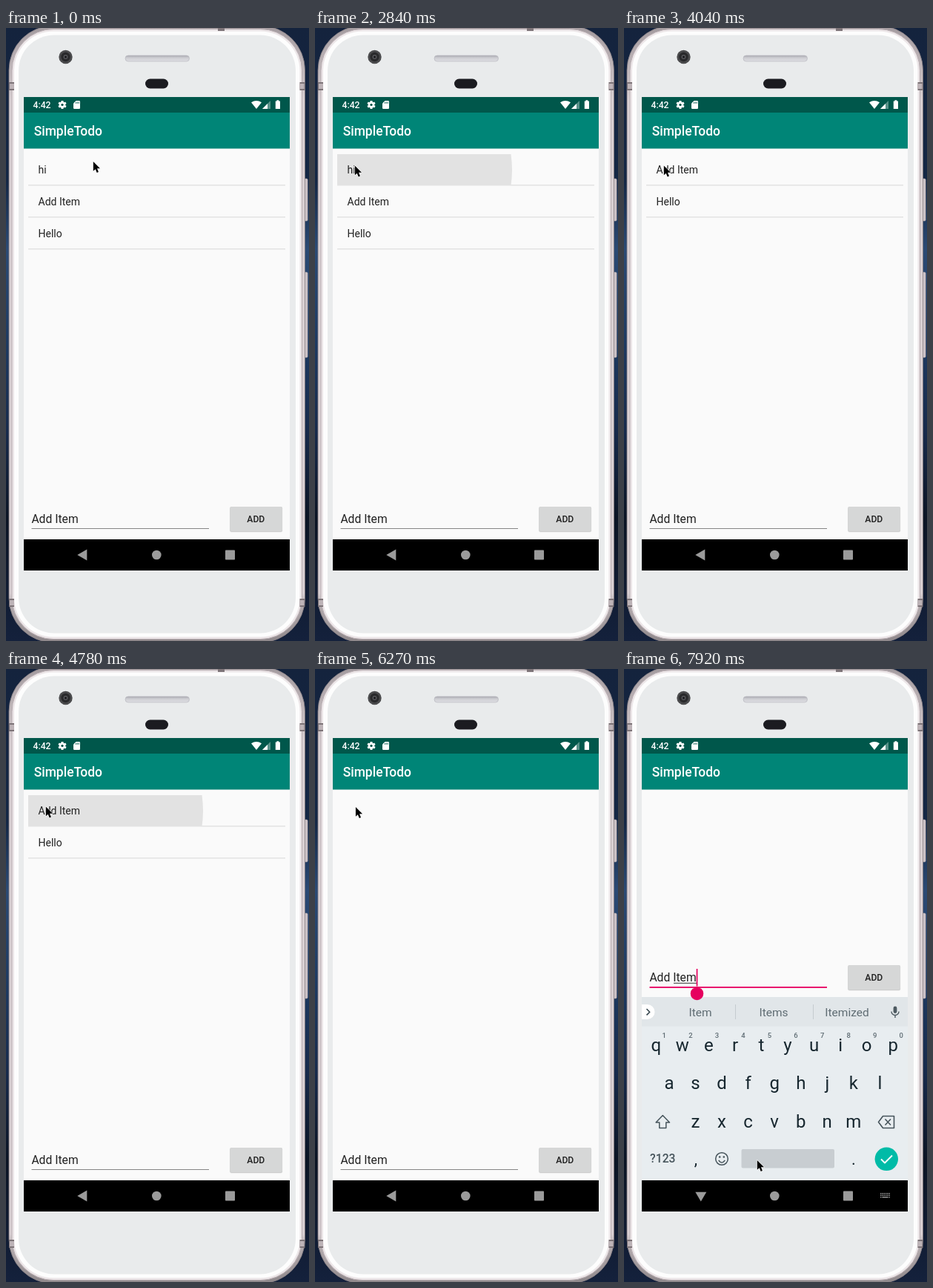
Animation of 409x826 px, one loop 8 s. Source, as an HTML page:

```html
<!DOCTYPE html>
<html lang="en">
<head>
<meta charset="utf-8">
<title>Todo list on a phone</title>
<style>
html, body { margin: 0; width: 100%; height: 100%; overflow: hidden; background: #12203a; }
svg { display: block; width: 409px; height: 826px; font-family: Roboto, sans-serif; }
.medium { font-weight: 500; }
.mid { text-anchor: middle; }
</style>
</head>
<body>
<svg viewBox="0 0 409 826" xmlns="http://www.w3.org/2000/svg">
  <defs>
    <linearGradient id="night" x2="0" y2="1">
      <stop offset="0" stop-color="#14233d"/>
      <stop offset=".25" stop-color="#142745"/>
      <stop offset=".36" stop-color="#2b4a74"/>
      <stop offset=".52" stop-color="#1d3960"/>
      <stop offset=".66" stop-color="#172a4b"/>
      <stop offset=".8" stop-color="#0b1424"/>
      <stop offset="1" stop-color="#14213c"/>
    </linearGradient>
    <linearGradient id="rim" x2="0" y2="1">
      <stop offset="0" stop-color="#a39b9f"/>
      <stop offset=".09" stop-color="#c9c0c3"/>
      <stop offset=".12" stop-color="#d9d0d3"/>
      <stop offset=".92" stop-color="#d9d0d3"/>
      <stop offset=".94" stop-color="#b3abae"/>
      <stop offset="1" stop-color="#8f888b"/>
    </linearGradient>
    <linearGradient id="slot" x2="0" y2="1">
      <stop offset="0" stop-color="#a9a9b0"/>
      <stop offset=".4" stop-color="#cdcdd2"/>
      <stop offset="1" stop-color="#dfdfe3"/>
    </linearGradient>
    <clipPath id="rowClip"><rect x="30" y="170" width="347" height="42"/></clipPath>
    <clipPath id="keysClip"><rect x="24" y="400" width="359" height="289"/></clipPath>
  </defs>

  <rect width="409" height="826" fill="url(#night)"/>

  <!-- phone body -->
  <g fill="#cfc5c9" stroke="#9d9499" stroke-width=".6">
    <rect x="401" y="203" width="6.200" height="57" rx="1.500"/>
    <rect x="401" y="329" width="6.200" height="115" rx="1.500"/>
  </g>
  <rect x="4" y="-3" width="399.500" height="831" rx="60" fill="url(#rim)" stroke="#8b8286" stroke-width=".8"/>
  <rect x="8" y="1.500" width="391.500" height="822" rx="56" fill="#ece6e8" stroke="#b9aeb2" stroke-width="1"/>
  <rect x="11" y="4.500" width="385.500" height="816" rx="53" fill="#fdfdfd"/>
  <rect x="17" y="9.500" width="374" height="806" rx="48" fill="#e9ebec"/>
  <g fill="#7d7478">
    <rect x="4" y="73" width="7" height="11"/>
    <rect x="396.500" y="73" width="7" height="11"/>
    <rect x="4" y="769" width="7" height="11"/>
    <rect x="396.500" y="769" width="7" height="11"/>
    <rect x="286" y="0" width="9" height="4"/>
  </g>
  <g fill="#bdb3b7">
    <rect x="5" y="75" width="6" height="7"/>
    <rect x="396.500" y="75" width="6" height="7"/>
    <rect x="5" y="771" width="6" height="7"/>
    <rect x="396.500" y="771" width="6" height="7"/>
  </g>
  <rect x="161" y="37" width="86.500" height="8" rx="4" fill="url(#slot)" stroke="#b9b9c0" stroke-width=".7"/>
  <circle cx="80.500" cy="39" r="9.200" fill="#4a4a4c"/>
  <circle cx="80.500" cy="39" r="6.200" fill="#29292b"/>
  <circle cx="80.500" cy="39" r="3" fill="#55555a"/>
  <circle cx="80.500" cy="39" r="1.500" fill="#161618"/>
  <rect x="188" y="68.500" width="31" height="13" rx="6.500" fill="#1b1b20"/>

  <!-- screen -->
  <rect x="24" y="93" width="359" height="638" fill="#fafafa"/>
  <rect x="24" y="93" width="359" height="21" fill="#00574b"/>
  <rect x="24" y="114" width="359" height="48.500" fill="#008577"/>
  <text x="36.500" y="108" font-size="12.2" class="medium" fill="#fff">4:42</text>
  <g id="gear" transform="translate(76 103.500)"></g>
  <path d="M94.500 98h4.300q1.200 0 1.200 1.200v8.600q0 1.200-1.200 1.200h-6.600q-1.200 0-1.200-1.200v-6.300z" fill="#fff"/>
  <path d="M94.400 99.800v2M96.300 99.500v2.300M98.200 99.500v2.300" stroke="#00574b" stroke-width=".9"/>
  <path d="M331 100.300Q338 95.600 345 100.300L338 109z" fill="#fff"/>
  <path d="M357 98v11h-11z" fill="#fff" opacity=".35"/>
  <path d="M353 102v7h-7z" fill="#fff"/>
  <path d="M365.500 97.200h2.800v1.200h1.700v10.600h-6.200V98.400h1.700z" fill="#fff"/>
  <text x="37.700" y="145" font-size="17.46" class="medium" fill="#fff">SimpleTodo</text>

  <g clip-path="url(#rowClip)"><circle id="ripple"/></g>
  <g id="rows" font-size="13.97" fill="#212121"></g>

  <g id="form">
    <text x="34.400" y="667" font-size="15.7" fill="#212121">Add Item</text>
    <rect id="line" x="34.500" width="239.500"/>
    <rect id="wordLine" x="67" y="668.800" width="31" height="1" fill="#333"/>
    <rect id="caret" x="97.700" y="650" width="1.700" height="23.500" fill="#e6005f"/>
    <rect x="302" y="646" width="71.300" height="33.500" rx="2" fill="#000" opacity=".07"/>
    <rect x="302.300" y="645.200" width="70.700" height="33.500" rx="2" fill="#c4c5c5"/>
    <rect x="302.300" y="645" width="70.700" height="33" rx="2" fill="#d6d7d7"/>
    <text x="337.300" y="666" font-size="12.2" class="medium mid" fill="#212121">ADD</text>
  </g>

  <g clip-path="url(#keysClip)"><g id="keys" fill="#16262e"></g></g>
  <path id="handle" d="M98.500 428L104.600 431A8.800 8.800 0 1 1 92.400 431z" fill="#e6005f"/>

  <!-- navigation bar -->
  <rect x="24" y="689" width="359" height="42" fill="#000"/>
  <g fill="#9b9b9b">
    <path id="back"/>
    <circle cx="203.300" cy="710" r="6.300"/>
    <rect x="296" y="703.500" width="13" height="13" rx=".8"/>
    <g id="imeIcon"></g>
  </g>

  <path id="pointer" d="M0 0V12.800L2.900 10.200L4.900 14.900L7.100 13.900L5.200 9.300H9.200z" fill="#000" stroke="#fff" stroke-width="1.200" stroke-linejoin="round" paint-order="stroke"/>
</svg>
<script>
const $ = id => document.getElementById(id);
const NS = 'http://www.w3.org/2000/svg';
const LOOP = 8000;

function add(parent, tag, attrs, text) {
  const el = document.createElementNS(NS, tag);
  set(el, attrs);
  if (text) el.textContent = text;
  parent.appendChild(el);
  return el;
}
function set(el, attrs) {
  for (const k in attrs) el.setAttribute(k, attrs[k]);
}
const show = (el, on) => el.setAttribute('visibility', on ? 'visible' : 'hidden');

// Last entry of a [time, ...values] list that has begun
function at(list, t) {
  let cur = list[0];
  for (const e of list) if (e[0] <= t) cur = e;
  return cur;
}

function buildGear() {
  const g = $('gear');
  for (let a = 0; a < 360; a += 60)
    add(g, 'rect', { x: -1.5, y: -5.6, width: 3, height: 4, rx: .5, fill: '#fff', transform: `rotate(${a})` });
  add(g, 'circle', { r: 3.1, fill: 'none', stroke: '#fff', 'stroke-width': 2.3 });
}

function buildRows() {
  return [0, 1, 2].map(i => {
    const g = add($('rows'), 'g', {});
    const label = add(g, 'text', { x: 43.6, y: 196 + 43 * i });
    add(g, 'rect', { x: 30, y: 211 + 43 * i, width: 347, height: 1.5, fill: '#e3e3e3' });
    return { g, label };
  });
}

function buildKeys() {
  const k = $('keys');
  const text = (s, x, y, size, more) =>
    add(k, 'text', { x, y, 'font-size': size, class: 'mid', ...more }, s);
  const stroke = (d, color, width) =>
    add(k, 'path', { d, fill: 'none', stroke: color, 'stroke-width': width, 'stroke-linejoin': 'round' });

  add(k, 'rect', { x: 24, y: 442, width: 359, height: 247, fill: '#e8edf0' });
  add(k, 'rect', { x: 24, y: 442, width: 359, height: 39.5, fill: '#e1e6e9' });
  add(k, 'path', { d: 'M24 452H31.500A10 10 0 0 1 31.500 472H24z', fill: '#fff' });
  stroke('M30.500 458L34.700 462.200L30.500 466.400', '#37474f', 1.6);
  for (const x of [150, 255]) add(k, 'rect', { x, y: 452, width: 1, height: 20, fill: '#c5cbcf' });
  ['Item', 'Items', 'Itemized'].forEach((w, i) =>
    text(w, 103 + 99 * i, 468.3, 15.5, { fill: '#5f6c73' }));
  add(k, 'rect', { x: 363.6, y: 454.5, width: 4.8, height: 9.5, rx: 2.4, fill: '#4d5a61' });
  stroke('M361 461.500A5 5 0 0 0 371 461.500M366 466.500V470', '#4d5a61', 1.4);

  const row = (letters, x0, y) =>
    [...letters].forEach((c, i) => text(c, x0 + 35.55 * i, y, 24));
  row('qwertyuiop', 43.3, 514.5);
  row('asdfghjkl', 61, 566);
  row('zxcvbnm', 96.5, 617.5);
  [...'1234567890'].forEach((c, i) =>
    text(c, 54.3 + 35.55 * i, 497, 9.5, { fill: '#5f6c73', class: 'mid medium' }));

  const grey = '#46545b';
  stroke('M52.300 601.500L61.500 611H56.800V618.500H47.800V611H43.100z', grey, 1.5);
  stroke('M349.500 602.500H364.500V618.500H349.500L343.500 610.500zM352.500 606.500L360 614.500M360 606.500L352.500 614.500', grey, 1.6);
  text('?123', 52.3, 665.3, 15.7, { fill: grey, class: 'mid medium' });
  text(',', 97, 668, 22);
  text('.', 310, 668, 22);
  add(k, 'circle', { cx: 132, cy: 660, r: 8.3, fill: 'none', stroke: grey, 'stroke-width': 1.5 });
  for (const x of [129.2, 134.8]) add(k, 'circle', { cx: x, cy: 657.5, r: 1.3, fill: grey });
  stroke('M127.700 662Q132 668 136.300 662', grey, 1.4);
  add(k, 'rect', { x: 158.5, y: 647, width: 125.5, height: 25.5, rx: 2, fill: '#c8cdd1' });
  add(k, 'circle', { cx: 354.3, cy: 660.3, r: 15.7, fill: '#00bba7' });
  stroke('M347 660.500L352 665.500L362 655.500', '#fff', 1.9);
}

function buildImeIcon() {
  const g = $('imeIcon');
  for (let r = 0; r < 3; r++)
    for (let c = 0; c < 6; c++)
      if (r < 2 || c === 0 || c === 5)
        add(g, 'rect', { x: 346 + 2.3 * c, y: 706 + 2.5 * r, width: 1.4, height: 1.5 });
  add(g, 'rect', { x: 348.4, y: 711, width: 8.2, height: 1.5 });
}

const pointer = [
  [0, 117.8, 180], [1050, 115.5, 184], [1200, 112.5, 188], [1350, 111.5, 190],
  [2100, 105.9, 190], [2250, 80, 190], [2400, 53.8, 185.5],
  [5220, 54.9, 186], [6720, 140, 500], [6870, 183, 668], [7170, 179.8, 662]
];

// time, centre, radius, shade
const OFF = [0, 0, '#fafafa'];
const WIDE = [195, 168, '#dadada'];
const FULL = [203, 180, '#d8d8d8'];
const FADE = [203, 180, '#ececec'];
const NARROW = [120, 146, '#e2e2e2'];
const ripples = [
  [0, ...OFF],
  [2700, ...NARROW], [2850, ...FADE], [2990, ...OFF],
  [3590, ...WIDE], [3740, ...FULL], [3890, ...FADE], [4040, ...OFF],
  [4780, ...NARROW], [4930, ...FULL], [5220, ...FADE], [5370, ...OFF],
  [5970, ...WIDE], [6120, ...FULL], [6270, ...OFF]
];

const items = ['hi', 'Add Item', 'Hello'];
const removed = [[0, 0], [3890, 1], [5220, 2], [6270, 3]];
// time, keyboard offset
const slide = [[0, 300], [7620, 110], [7770, 18], [7920, 0]];

buildGear();
buildKeys();
buildImeIcon();
const rows = buildRows();

function draw(t) {
  const [, px, py] = at(pointer, t);
  $('pointer').setAttribute('transform', `translate(${px} ${py})`);

  const [, cx, r, fill] = at(ripples, t);
  set($('ripple'), { cx, cy: 191, r, fill });

  const left = items.slice(at(removed, t)[1]);
  rows.forEach(({ g, label }, i) => {
    show(g, i < left.length);
    label.textContent = left[i] || '';
  });

  const focus = t >= 7470, open = t >= 7620, ready = t >= 7920;
  $('form').setAttribute('transform', `translate(0 ${open ? -246 : 0})`);
  set($('line'), focus
    ? { y: 674, height: 1.8, fill: '#e6005f' }
    : { y: 674, height: 1, fill: '#858585' });
  show($('caret'), focus);
  show($('wordLine'), ready);
  show($('handle'), focus);
  $('handle').setAttribute('transform', `translate(0 ${open ? 0 : 246})`);

  show($('keys'), open);
  $('keys').setAttribute('transform', `translate(0 ${at(slide, t)[1]})`);
  show($('imeIcon'), open);
  $('back').setAttribute('d', open
    ? 'M96.300 704.800H111.300L103.800 717.500z'
    : 'M96.300 710L109.300 702.500V717.500z');
}

const start = performance.now();
function tick(now) {
  draw(Math.max(0, now - start) % LOOP);
  requestAnimationFrame(tick);
}
draw(0);
requestAnimationFrame(tick);
</script>
</body>
</html>
```
